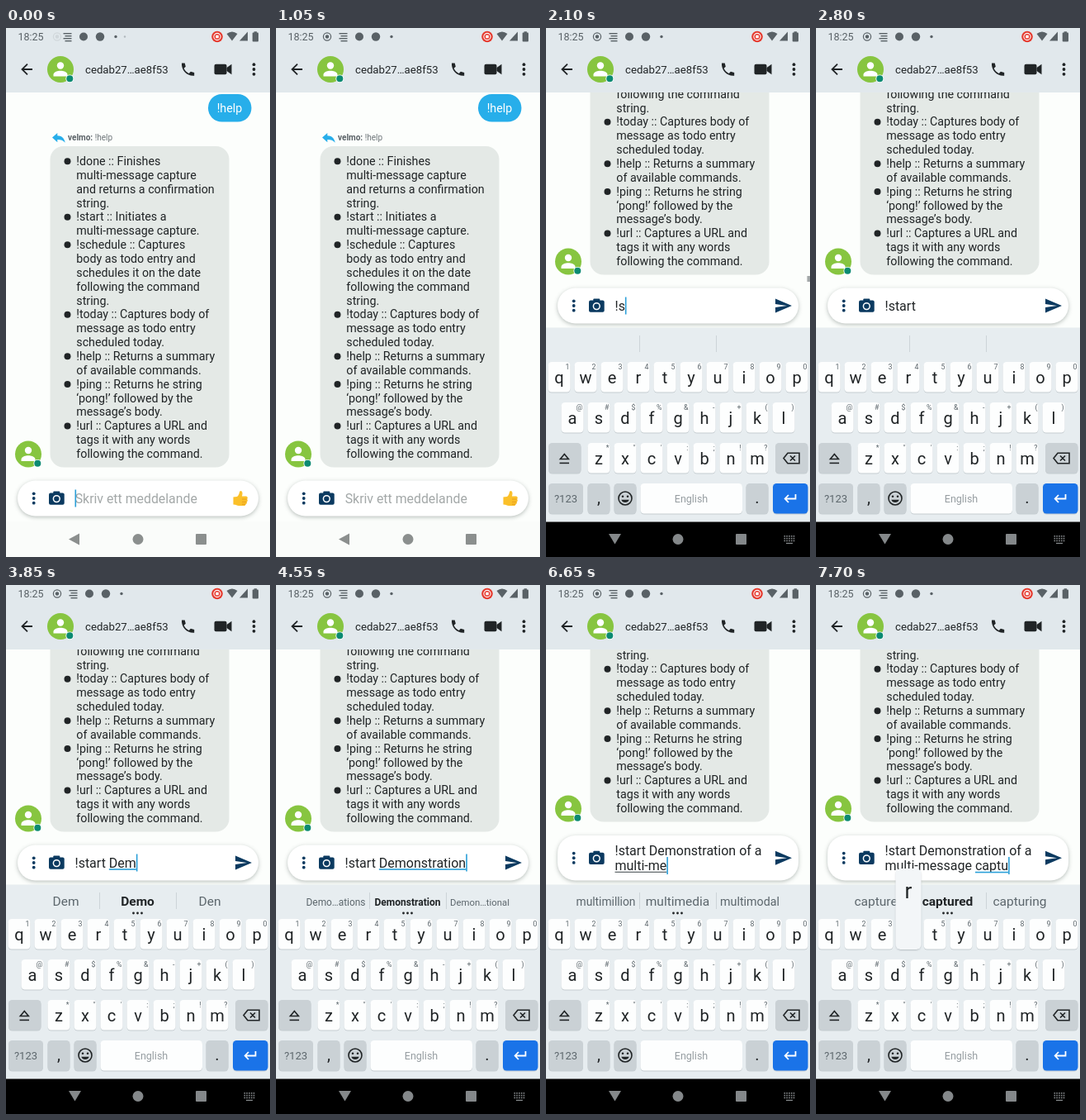
Animation, 320 px wide and 640 px high, one loop 8000 ms. Source, as an HTML page with a canvas:

```html
<!DOCTYPE html>
<html lang="en">
<head>
<meta charset="utf-8">
<title>Chat capture</title>
<style>
html, body { margin: 0; width: 100%; height: 100%; overflow: hidden; background: #fcfefc; }
canvas { display: block; width: 320px; height: 640px; }
</style>
</head>
<body>
<canvas id="stage"></canvas>
<script>
const W = 320, H = 640, STEP = 350, LOOP = 8000;
const canvas = document.getElementById('stage');
const g = canvas.getContext('2d');
const ratio = window.devicePixelRatio || 1;
canvas.width = W * ratio;
canvas.height = H * ratio;

const INK = '#202426', GREY = '#5c666c', NAVY = '#0b3a60', BLUE = '#1a73e8', CARET = '#2a9fd8';
const BAR = '#e1e8ec', PAPER = '#fcfefc', BOARD = '#e7edf0', BUBBLE = '#e4e9e6', SKY = '#27aeea';

// Typing steps: text, suggestions, flags.
// c caret, b bold middle word, u blue underline, k dark underline,
// U capitals, S symbols, s scroll bar, r key preview
const typing = [
  ['', 'The|I|Hej', 'cUs'],
  ['!', '', 'cs'],
  ['!s', '', 'cs'],
  ['!star', 'star|start|stars', 'cbu'],
  ['!start', '', ''],
  ['!start ', 'The|I|Hej', 'cU'],
  ['!start ', 'The|I|Hej', 'U'],
  ['!start Dem', 'Dem|Demo|Den', 'cbu'],
  ['!start Demonstr', 'Demonstrate|Demonstration|Demons', 'cbu'],
  ['!start Demonstration', 'Demo\u2026ations|Demonstration|Demon\u2026tional', 'cbu'],
  ['!start Demonstration of', 'off|of|if', 'cbu'],
  ['!start Demonstration of a', 'an|a|and', 'cbu'],
  ['!start Demonstration of a mu', 'must|my|music', 'cbus'],
  ['!start Demonstration of a multi', 'multiple|multi|multimedia', 'cbus'],
  ['!start Demonstration of a multi-', '', 'cS'],
  ['!start Demonstration of a multi-me', 'multimillion|multimedia|multimodal', 'ck'],
  ['!start Demonstration of a multi-messa', 'message|messages|massage', 'ck'],
  ['!start Demonstration of a multi-message c', 'can|c|could', 'cbu'],
  ['!start Demonstration of a multi-message captu', 'capture|captured|capturing', 'cbur']
];

const help = [
  '*!done :: Finishes', 'multi-message capture', 'and returns a confirmation', 'string.',
  '*!start :: Initiates a', 'multi-message capture.',
  '*!schedule :: Captures', 'body as todo entry and', 'schedules it on the date', 'following the command', 'string.',
  '*!today :: Captures body of', 'message as todo entry', 'scheduled today.',
  '*!help :: Returns a summary', 'of available commands.',
  '*!ping :: Returns he string', '\u2018pong!\u2019 followed by the', 'message\u2019s body.',
  '*!url :: Captures a URL and', 'tags it with any words', 'following the command.'
];

function font(size, weight) {
  g.font = `${weight || 400} ${size}px Roboto, "Noto Sans", sans-serif`;
}
function text(s, x, y, size, color, align, weight) {
  font(size, weight);
  g.fillStyle = color;
  g.textAlign = align || 'left';
  g.fillText(s, x, y);
}
function rect(x, y, w, h, color) {
  g.fillStyle = color;
  g.fillRect(x, y, w, h);
}
function round(x, y, w, h, r, color) {
  g.fillStyle = color;
  g.beginPath();
  g.roundRect(x, y, w, h, r);
  g.fill();
}
function disc(x, y, r, color) {
  g.fillStyle = color;
  g.beginPath();
  g.arc(x, y, r, 0, 7);
  g.fill();
}
function ring(x, y, r, color, width) {
  g.strokeStyle = color;
  g.lineWidth = width;
  g.beginPath();
  g.arc(x, y, r, 0, 7);
  g.stroke();
}
function shape(d, x, y, color, width) {
  g.save();
  g.translate(x, y);
  const p = new Path2D(d);
  if (width) {
    g.strokeStyle = color;
    g.lineWidth = width;
    g.stroke(p);
  } else {
    g.fillStyle = color;
    g.fill(p);
  }
  g.restore();
}
function shadow(color, blur, dy) {
  g.shadowColor = color;
  g.shadowBlur = blur * ratio;
  g.shadowOffsetY = dy * ratio;
}
function dots(x, y, gap, r, color) {
  for (let i = -1; i < 2; i++) disc(x, y + i * gap, r, color);
}

function avatar(x, y) {
  disc(x, y, 16, '#87c540');
  disc(x, y - 4.5, 4.2, '#fff');
  shape('M-8.5 8.5V6.5C-8.5 3 -3 1.8 0 1.8S8.5 3 8.5 6.5V8.5Z', x, y, '#fff');
  disc(x + 11.3, y + 11.3, 4.9, '#fff');
  disc(x + 11.3, y + 11.3, 4, '#0b8a72');
}

function statusBar(first) {
  const c = '#596166';
  text('18:25', 14.5, 15, 12.5, c);
  const shift = first ? -7 : 0;
  g.globalAlpha = first ? 0.12 : 1;
  ring(62, 10.5, 4.6, c, 1.2);
  disc(62, 10.5, 2.2, c);
  g.globalAlpha = 1;
  for (let i = 0; i < 4; i++) rect(76.5 + shift + (i % 2) * 2, 6 + i * 3, 10 - (i % 2) * 2, 1.4, c);
  disc(101 + shift, 10.5, 5, c);
  disc(121 + shift, 10.5, 5.2, c);
  disc(140 + shift, 10.5, 1.7, c);
  if (first) {
    g.globalAlpha = 0.35;
    disc(144, 10.5, 1.2, c);
    g.globalAlpha = 1;
  }
  disc(256, 10.5, 6.8, '#e5382c');
  ring(256, 10.5, 4.1, '#fff', 1.1);
  rect(254.2, 8.7, 3.6, 3.6, '#fff');
  shape('M-6.5 -3.5Q0 -8.5 6.5 -3.5L0 5Z', 274, 10.5, c);
  shape('M0 0V-11L-10 0Z', 293, 15.5, c);
  round(298.7, 5.5, 7.3, 11, 1, c);
  rect(300.6, 4.3, 3.5, 2, c);
}

function header(first) {
  rect(0, 0, W, 78, BAR);
  statusBar(first);
  shape('M14 0H1.5M8 -6.3L1.5 0L8 6.3', 18, 50, INK, 1.8);
  avatar(66, 50);
  text('cedab27\u2026ae8f53', 96, 54.5, 13.2, INK);
  shape('M-7.5 -7.6H-3.8L-2.7 -3.3L-4.9 -1.2C-3.5 1.6 -1.5 3.6 1.2 5L3.4 2.8L7.7 4V7.7C-1 8.4 -8.2 1 -7.5 -7.6Z', 220.5, 50, INK);
  round(252.5, 43.8, 15, 12.5, 2, INK);
  shape('M0 -2L6 -6.2V6.2L0 2Z', 267.5, 50, INK);
  dots(300.5, 50, 5.8, 1.9, INK);
}

function chat(dy) {
  g.save();
  g.beginPath();
  g.rect(0, 78, W, H);
  g.clip();
  g.translate(0, dy);
  round(245, 80, 52.5, 33.5, 16.5, SKY);
  text('!help', 271, 101.5, 14.3, '#fff', 'center');
  shape('M0 -0.4L6.3 -6V-2.8C11.5 -2.8 14.8 0.3 15.7 5.8C13.3 2.8 10.5 2 6.3 2V5.2Z', 56, 133, SKY);
  text('velmo:', 75, 136.3, 10, '#596166', 'left', 700);
  const nameWidth = g.measureText('velmo: ').width;
  text('!help', 75 + nameWidth, 136.3, 10, '#6c7478');
  round(53.5, 143, 217, 388.5, 16, BUBBLE);
  help.forEach((line, i) => {
    const y = 166 + i * 16.86;
    if (line[0] === '*') disc(74.5, y - 4.8, 4, INK);
    text(line.replace('*', ''), 85.3, y, 14.25, INK);
  });
  avatar(27, 515.5);
  g.restore();
}

function wrap(s, width) {
  const lines = [''];
  font(16);
  for (const word of s.match(/\S+\s*/g) || []) {
    const last = lines.length - 1;
    if (g.measureText(lines[last] + word.trim()).width > width) lines.push(word);
    else lines[last] += word;
  }
  return lines;
}

function thumb(x, y) {
  shape('M-8.5 -1.5L-4 -2C-1 -4 -1.5 -8 0 -9C3 -9 3 -5.5 2 -2.5H7C9.5 -2 9 0.5 8.2 1C9.3 2 9 4 7.7 4.3C8.4 5.5 7.8 7 6.5 7.2C6.3 8.6 5.5 9 4 9H-2C-4 9 -5 7.8 -8.5 7.5Z', x, y, '#fbc02a');
  shape('M2 1H8M2 4.3H7.5M2 7.2H6.3', x, y, '#e59a1c', 0.9);
}

function input(bottom, s, flags) {
  const lines = wrap(s, 184);
  const height = lines.length > 1 ? 54.5 : 43;
  const top = bottom - height, mid = bottom - height / 2;
  shadow('rgba(60,75,70,.35)', 5, 1.5);
  round(14, top, 292, height, 21.5, '#fff');
  shadow('transparent', 0, 0);
  dots(33.7, mid, 5.7, 1.9, NAVY);
  round(52, mid - 6.4, 18.7, 14.2, 2, NAVY);
  round(57.3, mid - 8.4, 8, 4, 1, NAVY);
  ring(61.3, mid + 0.6, 3.9, '#fff', 1.5);
  if (s) shape('M-10 -8.4L10 0L-10 8.4V2L4 0L-10 -2Z', 288, mid, NAVY);
  else {
    thumb(284, mid);
    text('Skriv ett meddelande', 83.7, mid + 5.6, 15.85, '#a3a8a8');
  }
  const start = mid - (lines.length - 1) * 9.3;
  lines.forEach((line, i) => text(line, 83.5, start + 5.7 + i * 18.6, 16, INK));
  const end = lines[lines.length - 1], y = start + (lines.length - 1) * 18.6;
  const right = 83.5 + g.measureText(end).width;
  if (/[uk]/.test(flags)) {
    const word = (end.match(/[\w-]+$/) || [''])[0];
    const w = g.measureText(word).width;
    const dark = flags.includes('k');
    rect(right - w, y + 7.2, w, dark ? 1.1 : 1.6, dark ? '#4a5256' : CARET);
  }
  if (flags.includes('c')) rect(s ? right : 83.5, y - 10.5, 1.6, 21, CARET);
}

function key(x, w, y, color) {
  round(x, y + 1, w, 36.5, 4.5, '#c6cdd1');
  round(x, y, w, 36.5, 4.5, color || '#fdfefe');
}

function letters(row, hints, x0, y, upper) {
  [...row].forEach((ch, i) => {
    const x = x0 + i * 32;
    key(x - 13.5, 27, y);
    text(upper ? ch.toUpperCase() : ch, x, y + 26, 20, INK, 'center');
    if (hints) text(hints[i], x + 12.5, y + 8.8, 8.8, GREY, 'right');
  });
}

function suggestions(list, bold) {
  rect(113, 372, 1, 20, '#cdd4d8');
  rect(206, 372, 1, 20, '#cdd4d8');
  if (!list) return;
  list.split('|').forEach((s, i) => {
    const middle = i === 1, strong = middle && bold ? 700 : 400;
    const room = middle ? 80 : 72;
    let size = 15.5;
    font(size, strong);
    size *= Math.min(1, room / g.measureText(s).width);
    text(s, [72.5, 159.5, 247][i], 388, size, strong > 400 ? INK : GREY, 'center', strong);
  });
  for (let i = -1; i < 2; i++) disc(159.5 + i * 5, 397, 1.4, INK);
}

function keyboard(list, flags) {
  const upper = flags.includes('U'), symbols = flags.includes('S');
  const mod = '#cad1d5';
  rect(0, 362.5, W, 235, BOARD);
  suggestions(list, flags.includes('b'));
  if (symbols) {
    letters('1234567890', '', 16, 404);
    letters('@#$_&-+()/', '', 16, 453);
  } else {
    letters('qwertyuiop', '1234567890', 16, 404, upper);
    letters('asdfghjkl', '@#$%&-+()', 32, 453, upper);
  }
  letters(symbols ? '*"\':;!?' : 'zxcvbnm', symbols ? '' : '*"\':;!?', 64, 502, upper);

  key(3, 39.5, 502, mod);
  if (symbols) text('=\\<', 22.5, 525, 13, GREY, 'center');
  else {
    const c = upper ? BLUE : INK;
    shape('M-5 3.5L0 -2.5L5 3.5Z', 22.3, 518, c, 1.6);
    rect(16.5, 525.6, 11.5, 1.6, c);
  }
  key(278, 39.5, 502, mod);
  shape('M-10 0L-5 -6.3H9V6.3H-5ZM-2 -3L4 3M4 -3L-2 3', 298, 520.5, INK, 1.6);

  key(3, 42, 551, mod);
  text(symbols ? 'ABC' : '?123', 24, 574, 13, GREY, 'center');
  key(50.5, 27, 551, mod);
  text(',', 64, 575, 20, INK, 'center');
  key(82.5, 27, 551, mod);
  ring(96, 569, 8, INK, 1.6);
  disc(93, 566.7, 1.3, INK);
  disc(99, 566.7, 1.3, INK);
  shape('M-4.7 1.2A5 5 0 0 0 4.7 1.2Z', 96, 569.5, INK);
  key(114.5, 123.5, 551);
  text('English', 176, 573.5, 12.5, '#969da1', 'center');
  key(242.5, 27, 551, mod);
  text('.', 256, 575, 20, INK, 'center');
  key(275, 42.5, 551, BLUE);
  shape('M6.5 -5V0.5H-6M-2 -4L-6.3 0.5L-2 5', 296, 569, '#fff', 1.8);
}

function preview(ch, x) {
  shadow('rgba(60,70,80,.2)', 2, 1);
  round(x - 15.5, 343, 31, 98, 6, '#f3f6f8');
  shadow('transparent', 0, 0);
  text(ch, x, 378.5, 26, INK, 'center');
}

function navBar(open) {
  const c = open ? '#84888a' : '#8b8f8e';
  rect(0, 597.5, W, 43, open ? '#000' : '#fafcfa');
  if (open) shape('M-7.5 -6H7.5L0 6.5Z', 83.5, 618, c);
  else shape('M6 -7V7L-7 0Z', 83, 618.5, c);
  disc(160, 618.5, 6.5, c);
  round(230, 612, 13, 13, 1, c);
  if (!open) return;
  for (let r = 0; r < 3; r++)
    for (let i = 0; i < 5; i++) rect(288.5 + i * 2.8, 614 + r * 2.8, 1.6, 1.6, c);
  rect(291, 622.8, 8, 1.3, c);
}

function draw(ms) {
  const n = Math.floor(ms / STEP), open = n >= 4;
  const [s, list, flags] = open ? typing[Math.min(n - 4, typing.length - 1)] : ['', '', n ? '' : 'c'];
  const rise = open ? (wrap(s, 184).length > 1 ? -245 : -233) : 0;
  g.setTransform(ratio, 0, 0, ratio, 0, 0);
  g.lineJoin = 'miter';
  rect(0, 0, W, H, PAPER);
  chat(rise);
  header(n === 0);
  if (flags.includes('s')) rect(316.5, rise + 533, 3.5, 7, '#a3a8a9');
  if (open) {
    // Cover bubbles that scrolled behind the input area.
    input(357.5, s, flags);
    keyboard(list, flags);
    if (flags.includes('r')) preview('r', 112);
  } else input(590.5, s, flags);
  navBar(open);
}

const began = performance.now();
function tick() {
  draw((performance.now() - began) % LOOP);
  requestAnimationFrame(tick);
}
tick();
</script>
</body>
</html>
```
